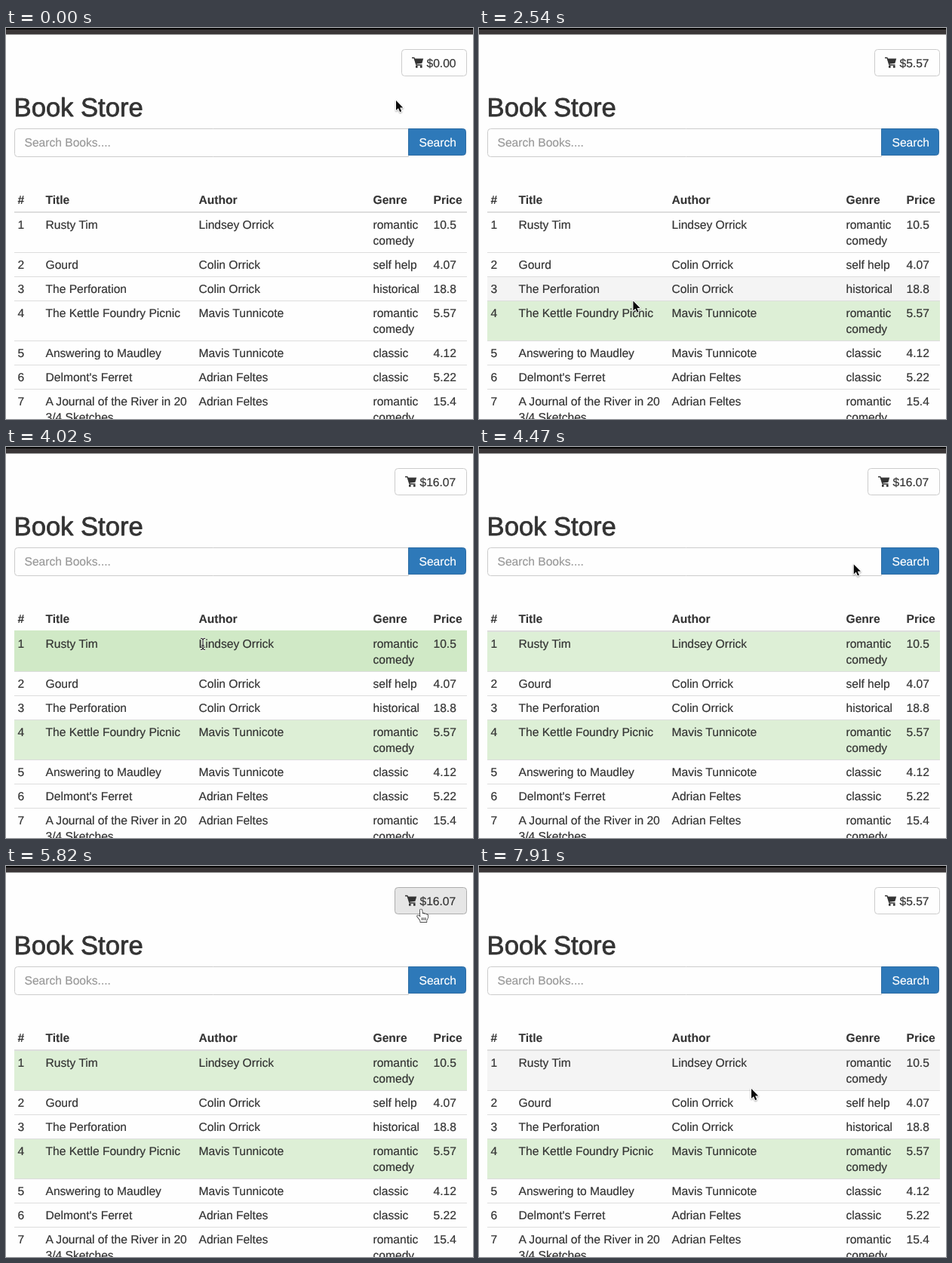
An HTML page with a canvas for the animation above (8 s loop, 619 by 518 pixels).

```html
<!DOCTYPE html>
<html lang="en">
<head>
<meta charset="utf-8">
<title>Book Store</title>
<style>
html, body { margin: 0; width: 100%; height: 100%; overflow: hidden; background: #fefefe; }
canvas { display: block; width: 619px; height: 518px; }
</style>
</head>
<body>
<canvas id="stage"></canvas>
<script>
const W = 619, H = 518, LOOP = 8000;
const LEFT = 11, RIGHT = 611, LINE = 21;
const FONT = '"Liberation Sans", Arial, sans-serif';
const canvas = document.getElementById('stage');
const ctx = canvas.getContext('2d');
const ratio = window.devicePixelRatio || 1;
canvas.width = W * ratio;
canvas.height = H * ratio;

const columns = [15.5, 52.5, 255.5, 486.5, 566.5];
const header = ['#', 'Title', 'Author', 'Genre', 'Price'];
const books = [
  ['Rusty Tim', 'Lindsey Orrick', 'romantic\ncomedy', '10.5'],
  ['Gourd', 'Colin Orrick', 'self help', '4.07'],
  ['The Perforation', 'Colin Orrick', 'historical', '18.8'],
  ['The Kettle Foundry Picnic', 'Mavis Tunnicote', 'romantic\ncomedy', '5.57'],
  ['Answering to Maudley', 'Mavis Tunnicote', 'classic', '4.12'],
  ["Delmont's Ferret", 'Adrian Feltes', 'classic', '5.22'],
  ['A Journal of the River in 20\n3/4 Sketches', 'Adrian Feltes', 'romantic\ncomedy', '15.4']
];

// Row height follows the tallest cell.
let nextTop = 244;
const rows = books.map((book, i) => {
  const lines = Math.max(...book.map(cell => cell.split('\n').length));
  const row = { top: nextTop, height: 11 + lines * LINE, cells: [String(i + 1), ...book] };
  nextTop += row.height;
  return row;
});

const mix = (a, b, u) => a + (b - a) * u;
const lerp = (p, q, u) => [mix(p[0], q[0], u), mix(p[1], q[1], u)];
const bend = via => (p, q, u) => lerp(lerp(p, via, u), lerp(via, q, u), u);

// A circling gesture that dies out on the way to its end.
function swirl(p, q, u) {
  const [x, y] = lerp(p, q, u), s = Math.sin(2 * Math.PI * u);
  return [x + 30 * s, y - 80 * (1 - u) * s * s];
}

// The pointer advances in even jumps from its last place.
const home = [517, 95];
const moves = [
  { start: 440, end: 1040, steps: 5, to: [203, 387], path: lerp },
  { start: 2540, end: 3120, steps: 5, to: [261, 261], path: bend([200, 320]) },
  { start: 4320, end: 5220, steps: 7, to: [514, 60], path: bend([788, 40]) },
  { start: 5370, end: 6110, steps: 6, to: [607, 86], path: swirl },
  { start: 6410, end: 7010, steps: 5, to: [361, 271], path: bend([545, 245]) },
  { start: 7910, end: 7910, steps: 1, to: [361, 294], path: lerp }
];

const clicks = [
  { at: 1640, row: 3, total: '$5.57' },
  { at: 4020, row: 0, total: '$16.07' },
  { at: 7460, row: 0, total: '$5.57' }
];

function pointerAt(t) {
  let place = home;
  for (const m of moves) {
    if (t < m.start) break;
    const gap = (m.end - m.start) / (m.steps - 1 || 1) || 1;
    const step = Math.min(m.steps, Math.floor((t - m.start) / gap + 1e-6) + 1);
    place = m.path(place, m.to, step / m.steps);
  }
  return place;
}

function overText(row, x, y) {
  if (!row) return false;
  setFont();
  return row.cells.some((cell, c) => cell.split('\n').some((line, i) =>
    Math.abs(y - row.top - 17 - i * LINE) < 8 &&
    x >= columns[c] && x < columns[c] + ctx.measureText(line).width));
}

function stateAt(t) {
  const chosen = new Set();
  let total = '$0.00';
  for (const c of clicks) {
    if (t < c.at) break;
    if (!chosen.delete(c.row)) chosen.add(c.row);
    total = c.total;
  }
  const [x, y] = pointerAt(t);
  const left = total.length > 5 ? 515 : 524;
  const onButton = x >= left - 1 && x < RIGHT && y >= 28 && y < 64;
  const hover = rows.findIndex(r => y >= r.top && y < r.top + r.height);
  return { chosen, total, x, y, left, onButton, hover, onText: overText(rows[hover], x, y) };
}

function rect(x, y, w, h, fill) {
  ctx.fillStyle = fill;
  ctx.fillRect(x, y, w, h);
}

function box(x, y, w, h, radii, fill, stroke) {
  ctx.beginPath();
  ctx.roundRect(x + 0.5, y + 0.5, w - 1, h - 1, radii);
  ctx.fillStyle = fill;
  ctx.fill();
  ctx.strokeStyle = stroke;
  ctx.lineWidth = 1;
  ctx.stroke();
}

function setFont(size = 15.6, weight = 'normal') {
  ctx.font = `${weight} ${size}px ${FONT}`;
}

// A hairline outline thickens the letters slightly.
function text(str, x, y, { color = '#333', size, weight, outline = 0.2 } = {}) {
  setFont(size, weight);
  ctx.fillStyle = ctx.strokeStyle = color;
  ctx.lineWidth = outline;
  ctx.lineJoin = 'round';
  str.split('\n').forEach((line, i) => {
    ctx.fillText(line, x, y + i * LINE);
    ctx.strokeText(line, x, y + i * LINE);
  });
}

const cartFrame = new Path2D('M0 1H3L6 10.5H13.5');
const cartBody = new Path2D('M3.2 2H15.2L13.4 8.2L5.4 9.2Z');
const cartWheels = new Path2D('M5 11.5H7.6V14.2H5ZM11 11.5H13.6V14.2H11Z');

function drawBasket(s) {
  box(s.left, 28, RIGHT - s.left, 36, 4,
    s.onButton ? '#e6e6e6' : '#fefefe', s.onButton ? '#adadad' : '#ccc');
  ctx.save();
  ctx.translate(s.left + 14, 38.5);
  shape(cartFrame, null, '#333', 1.3);
  ctx.fillStyle = '#333';
  ctx.fill(cartBody);
  ctx.fill(cartWheels);
  ctx.restore();
  text(s.total, s.left + 33.5, 52);
}

function drawSearch() {
  text('Book Store', 10.6, 116.5, { size: 34.6, outline: 0.8 });
  box(LEFT, 133, 523, 38, [4, 0, 0, 4], '#fefefe', '#ccc');
  text('Search Books....', 24.5, 157, { color: '#999' });
  box(533, 133, 77, 36, [0, 4, 4, 0], '#2e79b9', '#2e6da4');
  text('Search', 547.5, 157, { color: '#fff' });
}

function drawTable(s) {
  const width = RIGHT - LEFT;
  header.forEach((name, i) => text(name, columns[i], 233, { weight: 'bold', outline: 0.1 }));
  rows.forEach(({ top, height, cells }, i) => {
    const chosen = s.chosen.has(i), hot = s.hover === i;
    const lead = i ? 0 : 1;
    if (chosen || hot) {
      rect(LEFT, top, width, height, chosen ? (hot ? '#d0e9c6' : '#ddefd6') : '#f4f4f4');
    }
    rect(LEFT, top - lead, width, 1 + lead, chosen && hot ? '#d0e9c6' : '#ddd');
    cells.forEach((cell, c) => text(cell, columns[c], top + 22));
  });
}

function shape(path, fill, stroke, width) {
  ctx.strokeStyle = stroke;
  ctx.lineWidth = width;
  ctx.stroke(path);
  if (fill) {
    ctx.fillStyle = fill;
    ctx.fill(path);
  }
}

const arrow = new Path2D('M0 1V14L3 11.2L5.2 16.2L7.2 15.3L5.1 10.4H9.2Z');
const beam = new Path2D('M-3 -7.5Q0 -7.5 0 -5V5Q0 7.5 -3 7.5M3 -7.5Q0 -7.5 0 -5V5Q0 7.5 3 7.5M-1.8 2H1.8');
const hand = new Path2D('M-1.4 1Q0 -1 1.4 1L2 6Q3.6 4.6 4.6 6.3Q6.2 5.2 7 7Q9 6.2 9.3 8.5' +
  'Q9.5 12 7.5 14.5V17H-0.8V15Q-3 12 -5 9.5Q-5.2 7.4 -3 8.2L-0.7 10.4Z');
const knuckles = new Path2D('M1.5 11V14.5M3.8 11V14.5M6 11V14.5');

function drawPointer(s) {
  ctx.save();
  ctx.translate(s.x, s.y);
  ctx.lineJoin = 'round';
  if (s.onText) {
    shape(beam, null, '#fff', 2.6);
    shape(beam, null, '#111', 1.1);
  } else if (s.onButton) {
    shape(hand, '#fff', '#111', 1.3);
    shape(knuckles, null, '#111', 0.9);
  } else {
    ctx.shadowColor = 'rgba(0,0,0,.35)';
    ctx.shadowBlur = 2 * ratio;
    ctx.shadowOffsetY = ratio;
    shape(arrow, null, '#fff', 2);
    ctx.shadowColor = 'transparent';
    ctx.fillStyle = '#0a0a0a';
    ctx.fill(arrow);
  }
  ctx.restore();
}

function draw(t) {
  ctx.setTransform(ratio, 0, 0, ratio, 0, 0);
  ctx.textRendering = 'geometricPrecision';
  const s = stateAt(t);
  rect(0, 0, W, H, '#fefefe');
  rect(0, 0, W, 2, '#050505');
  rect(0, 2, W, 6, '#3a3637');
  rect(0, 8, W, 1, '#888');
  drawBasket(s);
  drawSearch();
  drawTable(s);
  drawPointer(s);
}

const start = performance.now();
function tick() {
  draw((performance.now() - start) % LOOP);
  requestAnimationFrame(tick);
}
tick();
</script>
</body>
</html>
```
